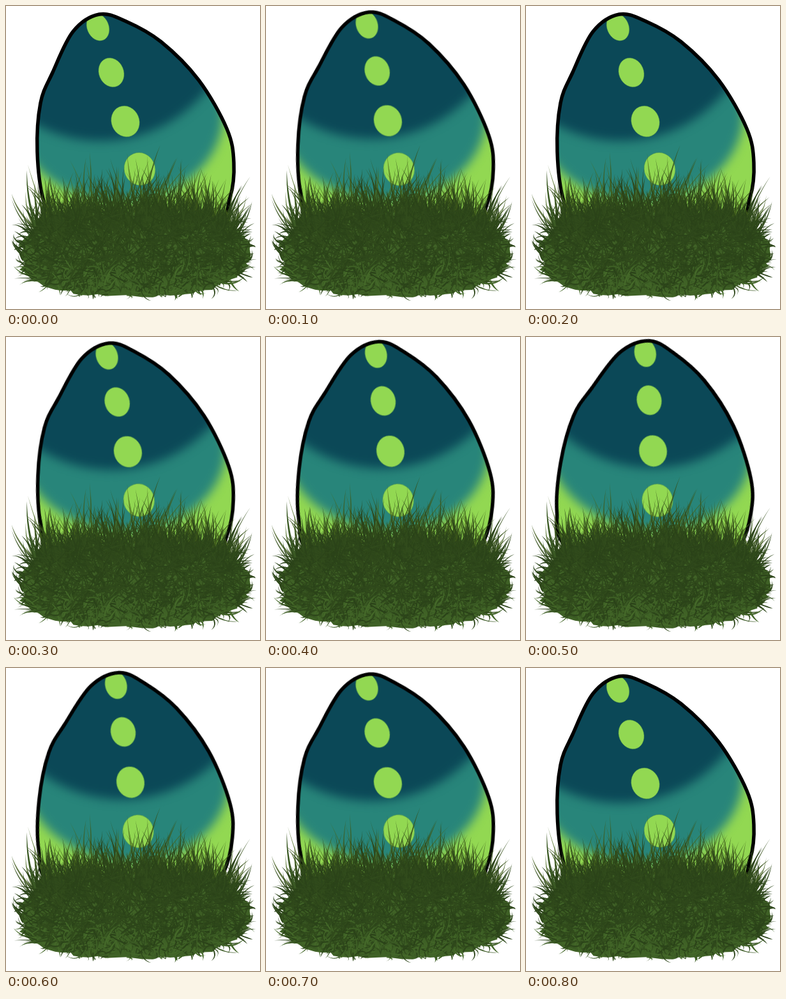
An HTML page with a canvas that plays this animation: 398x474 px, repeating every 1400 ms.

```html
<!DOCTYPE html>
<html lang="en">
<head>
<meta charset="utf-8">
<title>Wobbling egg</title>
<style>
  html, body { margin: 0; width: 100%; height: 100%; overflow: hidden; background: #fff; }
  canvas { display: block; }
</style>
</head>
<body>
<canvas id="stage" width="398" height="474"></canvas>
<script>
const W = 398, H = 474, TAU = Math.PI * 2;
const LOOP = 1400, STEP = 100, TILT = 3.9 * Math.PI / 180;
const PIVOT = { x: 204, y: 238 };
const TURF = { x: 200, y: 388, rx: 180, ry: 67 };

const DARK = '#0b4857', TEAL = '#28857a', LIME = '#92d852';
const DEEP = ['#2e471b', '#314b1c', '#2b4319'];
const FRESH = ['#3f6126', '#3a5923', '#446829'];
const OLIVE = ['rgba(74,104,30,.75)', 'rgba(64,90,28,.8)', 'rgba(54,80,28,.85)'];

const SHELL = [
  [146, 13], [188, 24], [243, 56], [302, 116], [346, 192], [357, 245], [351, 300],
  [325, 350], [205, 395], [85, 355], [59, 305], [49, 228], [54, 152], [73, 104], [105, 40]
];
const DOTS = [[144, 33], [165, 104], [187, 180.5], [209.5, 255]];

function layer(paint) {
  const canvas = document.createElement('canvas');
  canvas.width = W;
  canvas.height = H;
  paint(canvas.getContext('2d'));
  return canvas;
}

// Closed Catmull-Rom curve through the points.
function smoothPath(points) {
  const path = new Path2D(), n = points.length;
  const at = i => points[(i + n) % n];
  path.moveTo(...points[0]);
  for (let i = 0; i < n; i++) {
    const [a, b, c, d] = [at(i - 1), at(i), at(i + 1), at(i + 2)];
    path.bezierCurveTo(
      b[0] + (c[0] - a[0]) / 6, b[1] + (c[1] - a[1]) / 6,
      c[0] - (d[0] - b[0]) / 6, c[1] - (d[1] - b[1]) / 6,
      c[0], c[1]);
  }
  path.closePath();
  return path;
}

function paintEgg(g) {
  const shell = smoothPath(SHELL);
  const oval = (x, y, rx, ry, color, turn = 0) => {
    g.beginPath();
    g.ellipse(x, y, rx, ry, turn, 0, TAU);
    g.fillStyle = color;
    g.fill();
  };
  g.save();
  g.clip(shell);
  g.fillStyle = LIME;
  g.fillRect(0, 0, W, H);
  g.filter = 'blur(8px)';
  oval(178, 170, 162, 136, TEAL);
  oval(148, -3, 214, 214, DARK);
  g.filter = 'none';
  g.strokeStyle = 'rgba(70,135,70,.45)';
  DOTS.forEach(([x, y], i) => {
    oval(x, y, 17 + 2.4 * i, 22 + 1.3 * i, LIME, -0.4);
    g.stroke();
  });
  g.restore();
  g.lineWidth = 5.5;
  g.stroke(shell);
}

function makeRandom(seed) {
  return () => {
    seed = (seed * 1664525 + 1013904223) % 4294967296;
    return seed / 4294967296;
  };
}

function paintGrass(g) {
  const random = makeRandom(77);
  const between = (a, b) => a + (b - a) * random();
  const pick = list => list[Math.floor(random() * list.length)];
  const clamp = (v, a, b) => Math.min(b, Math.max(a, v));

  // Rounded box, |x|^2.5 + |y|^2.5 = 1.
  function turfPoint(turn, scale) {
    const squash = v => Math.sign(v) * Math.abs(v) ** 0.8;
    return [
      TURF.x + squash(Math.cos(turn)) * TURF.rx * scale,
      TURF.y + squash(Math.sin(turn)) * TURF.ry * scale
    ];
  }

  // A tapered, bent leaf from its root to a pointed tip.
  function blade(x, y, angle, length, width, bend, color) {
    const dx = Math.cos(angle), dy = Math.sin(angle);
    const tipX = clamp(x + dx * length, between(8, 18), between(382, 394));
    const tipY = Math.min(y + dy * length, between(452, 463));
    const mx = x + dx * length * 0.55 - dy * bend;
    const my = y + dy * length * 0.55 + dx * bend;
    const wx = -dy * width / 2, wy = dx * width / 2;
    g.beginPath();
    g.moveTo(x - wx, y - wy);
    g.quadraticCurveTo(mx - wx, my - wy, tipX, tipY);
    g.quadraticCurveTo(mx + wx, my + wy, x + wx, y + wy);
    g.fillStyle = color;
    g.fill();
  }

  function fringe(count, minLength, maxLength, colors) {
    for (let i = 0; i < count; i++) {
      const u = between(-1, 1);
      blade(200 + u * 158, 343 + u * u * 14 + between(-8, 10),
        -Math.PI / 2 + u * 0.12 + between(-0.6, 0.6),
        between(minLength, maxLength) * (1 - 0.2 * u * u),
        between(1.8, 3.2), between(-14, 14), pick(colors));
    }
  }

  fringe(36, 95, 125, OLIVE);
  fringe(330, 55, 94, OLIVE.concat(DEEP));

  g.beginPath();
  for (let i = 0; i < 90; i++) {
    g.lineTo(...turfPoint(i / 90 * TAU, between(0.95, 1.03)));
  }
  g.fillStyle = FRESH[0];
  g.fill();

  fringe(330, 30, 64, DEEP);

  for (let i = 0; i < 1900; i++) {
    const turn = between(0, TAU);
    const [x, y] = turfPoint(turn, Math.sqrt(random()) * 0.98);
    const angle = random() < 0.65 ? -Math.PI / 2 + between(-1.5, 1.5) : turn + between(-1, 1);
    const isDeep = random() > (y - 400) / 75;
    blade(x, y, angle, between(18, 46) * (Math.sin(angle) > 0.3 ? 0.5 : 1),
      between(1.4, 3), between(-12, 12), pick(isDeep ? DEEP : FRESH));
  }

  blade(46, 345, -1.72, 89, 3.5, -7, FRESH[1]);
}

// A small nod, then a large one, then rest; the pose changes in hard steps.
function tiltAt(time) {
  const step = Math.floor(time / STEP);
  return TILT * Math.max(0, 1 - Math.abs(step - 1), 3 - Math.abs(step - 5));
}

const egg = layer(paintEgg);
const grass = layer(paintGrass);
const ctx = document.getElementById('stage').getContext('2d');
const start = performance.now();

function draw() {
  ctx.fillStyle = '#fff';
  ctx.fillRect(0, 0, W, H);
  ctx.save();
  ctx.translate(PIVOT.x, PIVOT.y);
  ctx.rotate(tiltAt((performance.now() - start) % LOOP));
  ctx.drawImage(egg, -PIVOT.x, -PIVOT.y);
  ctx.restore();
  ctx.drawImage(grass, 0, 0);
  requestAnimationFrame(draw);
}
draw();
</script>
</body>
</html>
```
